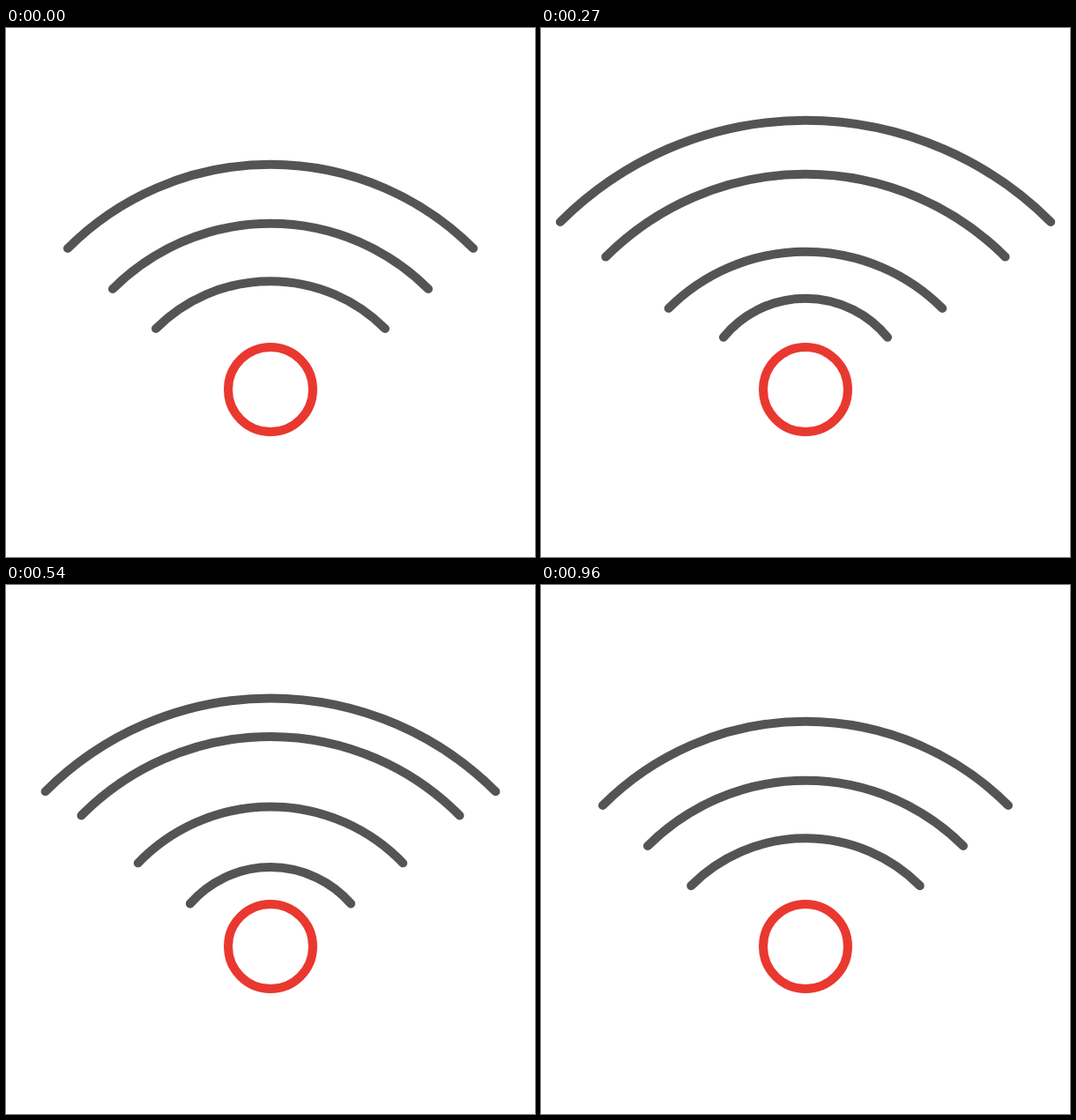
These frames come from a looping animation (600x600 px, 2.05 s). An HTML page:

```html
<!DOCTYPE html>
<html lang="en">
<head>
<meta charset="utf-8">
<title>Signal waves</title>
<style>
  html, body { margin: 0; width: 100%; height: 100%; overflow: hidden; background: #fff; }
  svg { display: block; width: 100%; height: 100%; fill: none; stroke-width: 10; }
  #waves { stroke: #545454; stroke-linecap: round; }
  circle { stroke: #e9382f; }
</style>
</head>
<body>
<svg viewBox="0 0 600 600">
  <g id="waves"></g>
  <circle cx="300" cy="410" r="48"/>
</svg>
<script>
const LOOP = 2050, STEP = 30, LAST = 32;

// An arc: half width, height of its ends, rise of its middle (a quarter circle by default).
const arc = (w, y, rise = w * Math.tan(Math.PI / 8)) => [w, y, rise];
const origin = arc(48, 384, 27.3);
const inner = arc(130, 341);
const middle = arc(179, 296);
const outer = arc(230, 250);
const far = arc(279, 219.5);

// Slow start, steady finish: cubic-bezier(.333, 0, .833, .833), solved by bisection.
function easeIn(x) {
  let lo = 0, hi = 1;
  for (let i = 0; i < 24; i++) {
    const u = (lo + hi) / 2, v = 1 - u;
    if (u * v * v + 2.5 * v * u * u + u ** 3 < x) lo = u; else hi = u;
  }
  return 2.5 * (1 - lo) * lo * lo + lo ** 3;
}
const accelerate = x => x ** 1.55;
const easeInOut = x => x * x * (3 - 2 * x);
const easeOut = x => 1 - (1 - x) ** 4;
const linear = x => x;

// Times are counted in steps.
const move = (start, end, from, to, ease) => ({ start, end, from, to, ease });
const leaving = (until, ...moves) => ({ since: 0, until, moves });
const entering = (start, length, to) => ({
  since: start, until: Infinity,
  moves: [move(start, start + length, origin, to, easeOut)]
});

const waves = [
  leaving(9.5, move(0, 9.1, outer, far, accelerate)),
  leaving(17.5, move(0, 18.6, middle, far, easeInOut)),
  leaving(21.2,
    move(5, 15, inner, outer, easeIn),
    move(15, 20.8, outer, far, linear)),
  entering(7.42, 23, outer),
  entering(10.75, 23, middle),
  entering(14, 23.5, inner)
];

const group = document.getElementById("waves");
for (const wave of waves) {
  wave.path = document.createElementNS("http://www.w3.org/2000/svg", "path");
  group.append(wave.path);
}

function shape({ since, until, moves }, k) {
  if (k < since || k > until) return "";
  const m = moves.find(m => k < m.end) || moves[moves.length - 1];
  const p = m.ease(Math.min(1, Math.max(0, (k - m.start) / (m.end - m.start))));
  const [w, y, rise] = m.from.map((a, i) => a + (m.to[i] - a) * p);
  const r = (w * w + rise * rise) / (2 * rise);
  return `M${300 - w} ${y}A${r} ${r} 0 0 1 ${300 + w} ${y}`;
}

const begin = performance.now();
function draw() {
  const t = (performance.now() - begin) % LOOP;
  const k = Math.floor(t / STEP);
  // After the last step the waves rest in the pose they began with.
  for (const wave of waves) wave.path.setAttribute("d", shape(wave, Math.min(k, LAST)));
  requestAnimationFrame(draw);
}
draw();
</script>
</body>
</html>
```
